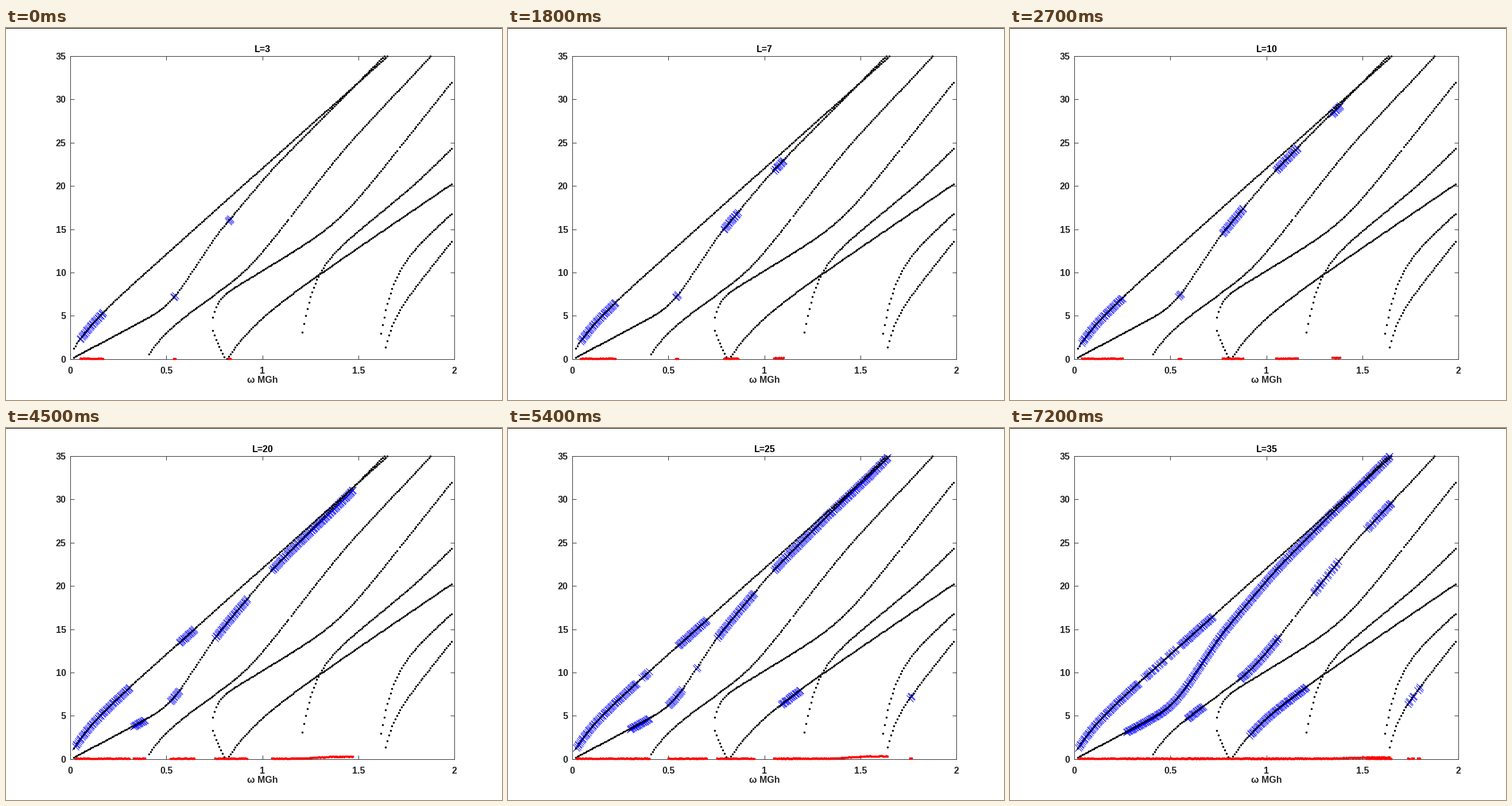
These frames come from a looping animation (864x648 px, 8000 ms). A matplotlib script:

```python
import numpy as np
import matplotlib.pyplot as plt
from matplotlib.animation import FuncAnimation
from matplotlib.patches import Rectangle

W, H, DPI = 864, 648, 100
PX = 72 / DPI                                  # points per pixel
LEFT, RIGHT, TOP, BOTTOM = 112.2, 781.2, 48.8, 576.8
X_MAX, Y_MAX = 2, 35
DOT_RATE, CROSS_RATE = 120, 240                # samples per unit of x
GREY = "#262626"
LEVELS = [3, 5, 7, 10, 15, 20, 25, 30, 35]
HOLD, FRAMES, INTERVAL = 9, 80, 100

plt.rcParams["font.family"] = "Liberation Sans"


class Branch:
    """Line with a decaying start and soft bends (position, slope, width)."""

    def __init__(self, x0, x1, y0, slope, rise=0, decay=1, bends=(), skip=None):
        self.x0, self.x1, self.y0, self.slope = x0, x1, y0, slope
        self.rise, self.decay, self.bends, self.skip = rise, decay, bends, skip

    def __call__(self, x):
        u = x - self.x0
        y = self.y0 + self.slope * u + self.rise * (1 - np.exp(-u / self.decay))
        for at, slope, width in self.bends:
            y = y + slope * width * np.logaddexp(0, (x - at) / width)
        return y

    def dots(self):
        n = np.arange(round(self.x0 * DOT_RATE), round(self.x1 * DOT_RATE) + 1)
        if self.skip:
            n = n[n != round(self.skip * DOT_RATE)]
        x = n / DOT_RATE
        y = self(x)
        keep = (y >= 0) & (y <= Y_MAX + 0.05)
        return x[keep], y[keep]


START, END = 2 / 120, 238 / 120
A = Branch(START, END, 1.25, 21, 1.15, 0.07, [(0.2, -1.2, 0.1)])
B = Branch(START, END, 0.2, 11.8,
           bends=[(0.515, 22, 0.035), (0.76, -7.5, 0.02), (1.05, -4, 0.03)])
C = Branch(0.4083, END, 0.55, 15.5, 1.6, 0.08,
           [(0.925, 13, 0.05), (1.42, -5, 0.05)], skip=1.1417)
D = Branch(0.7417, END, 4.85, 13.5, 1.9, 0.025, [(1.4, 14.5, 0.07)],
           skip=1.7083)
D_LOW = Branch(0.7417, 0.8083, 3.3, -42, -0.6, 0.02)
E = Branch(0.8167, END, 0.05, 15.1, 2.55, 0.13)
F = Branch(1.2083, END, 3.1, 18, 6.5, 0.058, [(1.8, 4, 0.05)])
G = Branch(1.6167, END, 2.95, 20, 6.5, 0.06)
K = Branch(1.6417, END, 1.4, 28, 2.6, 0.04)
BRANCHES = [A, B, C, D, D_LOW, E, F, G, K]

# Each band widens through a few (level, left, right) keys.
BANDS = {
    A: [[(3, 0.05, 0.17), (25, 0.02, 0.335)],
        [(15, 0.585, 0.592), (25, 0.55, 0.7), (35, 0.55, 0.72)]],
    B: [[(20, 0.33, 0.39), (30, 0.27, 0.41)],
        [(3, 0.535, 0.545), (15, 0.54, 0.56), (30, 0.48, 0.577),
         (35, 0.32, 0.8)],
        [(25, 0.643, 0.653), (30, 0.635, 0.69)],
        [(3, 0.82, 0.835), (15, 0.755, 0.895), (30, 0.755, 0.975),
         (35, 0.755, 1.05)],
        [(3, 1.06, 1.05), (7, 1.05, 1.1), (15, 1.05, 1.225),
         (25, 1.05, 1.5), (30, 1.0, 1.65)],
        [(10, 1.34, 1.385), (20, 1.25, 1.47), (25, 1.25, 1.645)]],
    C: [[(30, 0.6, 0.66), (35, 0.588, 0.67)],
        [(30, 0.905, 1.05), (35, 0.863, 1.065)],
        [(30, 1.62, 1.64), (35, 1.56, 1.65)]],
    E: [[(25, 1.087, 1.19), (35, 0.91, 1.21)]],
}
# Bands with many missing crosses.
THIN_BANDS = {
    A: [[(25, 0.36, 0.4), (35, 0.36, 0.53)]],
    C: [[(35, 1.24, 1.375)], [(35, 1.515, 1.56)]],
    K: [[(25, 1.75, 1.775), (30, 1.735, 1.805)]],
}

grid = np.arange(1, X_MAX * CROSS_RATE) / CROSS_RATE
rng = np.random.default_rng(4)
chance = rng.random(grid.size)
noise = rng.uniform(-0.03, 0.04, grid.size)


def covered(bands, step):
    """Mark the grid positions inside any band at the given step."""
    inside = np.zeros(grid.size, bool)
    for keys in bands:
        level, left, right = zip(*keys)
        when = [LEVELS.index(v) for v in level]
        if step >= when[0]:
            inside |= ((grid >= np.interp(step, when, left) - 0.001)
                       & (grid <= np.interp(step, when, right) + 0.001))
    return inside


def crosses_at(step):
    """Crosses on the branches and the residual of each one."""
    peak = 0.27 - 0.012 * abs(LEVELS[step] - 25)
    xs, ys, errors = [], [], []
    for branch in BRANCHES:
        keep = covered(BANDS.get(branch, ()), step)
        keep |= covered(THIN_BANDS.get(branch, ()), step) & (chance < 0.6)
        keep &= branch(grid) <= Y_MAX + 0.25
        if not keep.any():
            continue
        x = grid[keep]
        err = 0.07 + noise[keep]
        if branch is B:
            err += peak * np.clip((x - x.max() + 0.3) / 0.2, 0, 1)
        xs.append(x)
        ys.append(branch(x) - err)
        errors.append(err)
    return [np.concatenate(part) for part in (xs, ys, errors)]


states = [crosses_at(step) for step in range(len(LEVELS))]

fig = plt.figure(figsize=(W / DPI, H / DPI), dpi=DPI, facecolor="white")
ax = fig.add_axes([LEFT / W, 1 - BOTTOM / H,
                   (RIGHT - LEFT) / W, (BOTTOM - TOP) / H])
ax.set(xlim=(0, X_MAX), ylim=(0, Y_MAX))
ax.set_xticks(np.arange(0, 2.1, 0.5))
ax.set_yticks(range(0, 36, 5))
ax.tick_params(direction="in", top=True, right=True, length=6.7 * PX,
               width=0.95 * PX, color=GREY, labelbottom=False, labelleft=False)
for spine in ax.spines.values():
    spine.set(linewidth=0.95 * PX, color=GREY)
fig.add_artist(Rectangle((0, 1 - 1 / H), 1, 1 / H, transform=fig.transFigure,
                         color="black", lw=0, antialiased=False))


def label(x, y, text, color=GREY, ha="center"):
    return fig.text(x / W, 1 - y / H, text, color=color, ha=ha,
                    va="baseline", size=16 * PX, weight="bold")


for v in ax.get_xticks():
    label(LEFT + v / X_MAX * (RIGHT - LEFT), 601.5, f"{v:g}")
for v in ax.get_yticks():
    label(104.5, BOTTOM - v / Y_MAX * (BOTTOM - TOP) + 6, f"{v:g}", ha="right")
label(447, 617.5, "ω MGh")
title = label(447, 42.5, "", "black")


def marks(marker, size, color, edge, z):
    return ax.plot([], [], marker, ms=size * PX, color=color, mew=edge * PX,
                   clip_on=False, zorder=z)[0]


blue = marks("x", 12, "blue", 1, 3)
black = marks("o", 3.5, "black", 0, 4)
red = marks("o", 3.8, "red", 0, 5)
black.set_data(*np.hstack([branch.dots() for branch in BRANCHES]))


def update(frame):
    step = min(frame // HOLD, len(LEVELS) - 1)
    x, y, err = states[step]
    title.set_text(f"L={LEVELS[step]}")
    blue.set_data(x, y)
    red.set_data(x, err)
    return title, blue, red


anim = FuncAnimation(fig, update, frames=FRAMES, interval=INTERVAL,
                     repeat=True, repeat_delay=0)
plt.show()
```
